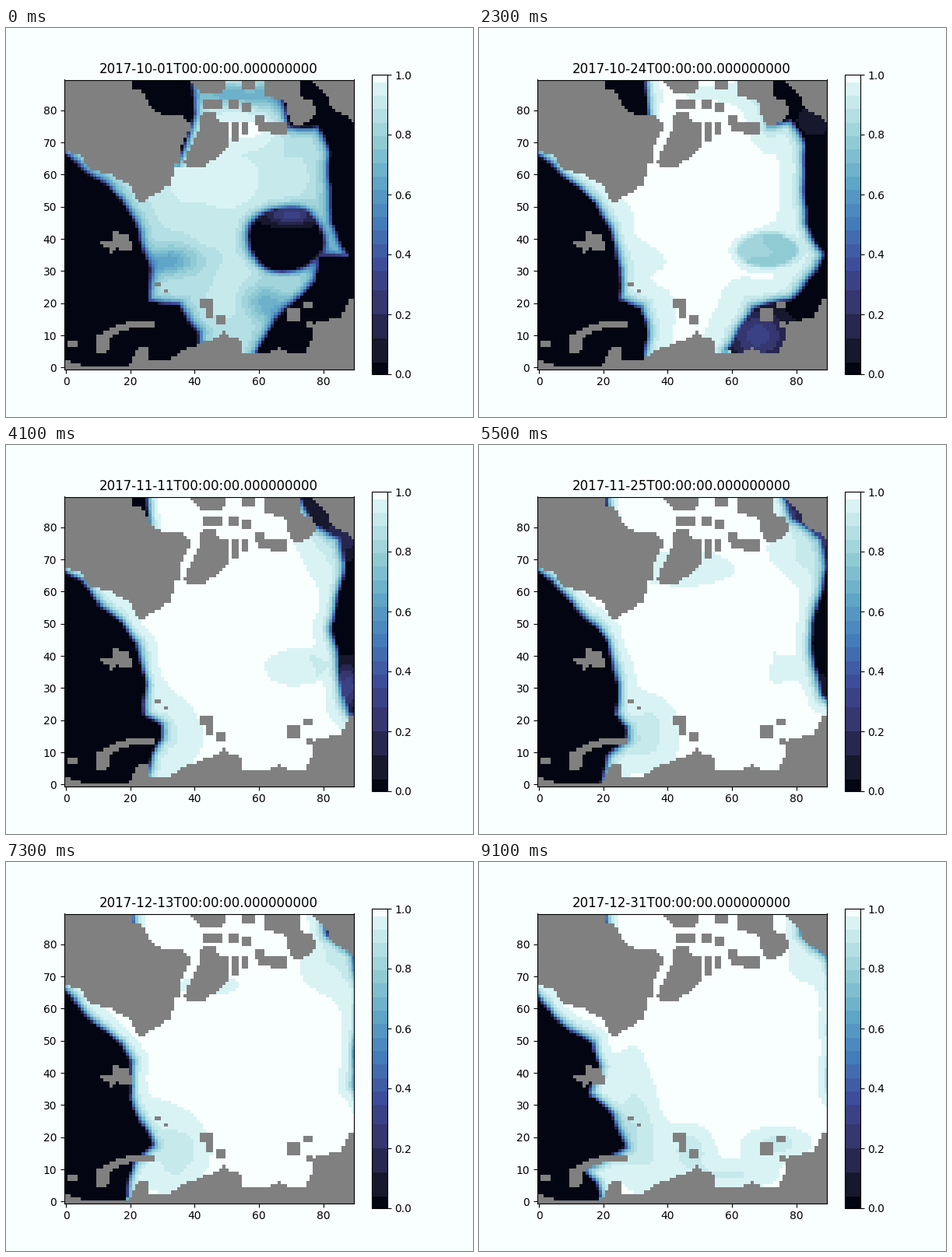
Animation of 600x500 px, one loop 9200 ms. Source, as a matplotlib script:

```python
import numpy as np
import matplotlib.pyplot as plt
from matplotlib.animation import FuncAnimation
from matplotlib.colors import ListedColormap, to_rgb
from matplotlib.path import Path

N, DAYS = 90, 92
CELL = 372 / N
PAPER = "#f9fefe"

# Cell centres in stage pixels, row 0 at the bottom of the map.
X, Y = np.meshgrid(75 + CELL * (np.arange(N) + .5),
                   438.5 - CELL * (np.arange(N) + .5))
POINTS = np.column_stack([X.ravel(), Y.ravel()])


def ice_palette():
    """Twenty flat bands from near-black water to white ice."""
    stops = {0: "#030512", 1: "#17172d", 3: "#363670", 5: "#3e4d9b",
             8: "#447bb9", 11: "#5ea5c7", 14: "#90cbd4", 18: "#d9f3f4",
             19: PAPER}
    rgb = np.array([to_rgb(c) for c in stops.values()])
    bands = np.column_stack([np.interp(np.arange(20), list(stops), channel)
                             for channel in rgb.T])
    edges = np.append(.04 + .08 * np.arange(4), np.linspace(.345, .975, 15))
    levels = (np.arange(400) + .5) / 400
    cmap = ListedColormap(bands[np.searchsorted(edges, levels)])
    cmap.set_bad("#808080")
    return cmap


# ---- land, in stage pixels
GREENLAND = [(60, 50), (160, 50), (160, 78), (174, 78), (183, 98), (198, 110),
             (227, 110), (238, 126), (225, 153), (225, 170), (216, 177),
             (212, 201), (186, 216), (178, 222), (170, 222), (158, 202),
             (134, 187), (108, 181), (97, 165), (60, 148)]
ELLESMERE = [(247, 113), (258, 108), (270, 108), (272, 121), (285, 125),
             (288, 151), (268, 168), (250, 180), (233, 178), (229, 174),
             (236, 152), (247, 130)]
MAINLAND = [(332, 50), (378, 50), (378, 89), (394, 91), (398, 112),
            (376, 125), (365, 121), (357, 92), (332, 86)]
NORTH_ISLE = [(238, 50), (283, 50), (283, 80), (252, 84), (238, 70)]
ALASKA = [(394, 50), (460, 50), (460, 128), (414, 100), (412, 88), (394, 70)]
SIBERIA = [(60, 450), (60, 427), (82, 427), (98, 434), (157, 435), (169, 412),
           (181, 410), (184, 427), (208, 427), (227, 414), (274, 396),
           (281, 387), (285, 396), (300, 400), (304, 417), (340, 417),
           (350, 409), (360, 417), (384, 417), (394, 398), (394, 379),
           (430, 371), (441, 348), (460, 346), (460, 450)]
NOVAYA_ZEMLYA = [(116, 416), (116, 394), (158, 376), (191, 376), (191, 384),
                 (164, 384), (136, 394), (130, 417)]
SVALBARD = [(121, 272), (137, 272), (137, 262), (158, 264), (162, 288),
            (142, 282), (134, 293), (132, 284), (121, 277)]
# Islets: left, top, width, height
ISLETS = [(303, 60, 17, 20), (254, 92, 24, 12), (285, 91, 15, 12),
          (303, 96, 13, 12), (270, 122, 14, 8), (289, 122, 8, 21),
          (303, 120, 9, 18), (319, 113, 13, 13), (324, 121, 14, 13),
          (340, 121, 22, 16), (78, 402, 14, 8), (191, 325, 8, 8),
          (203, 334, 5, 6), (250, 348, 16, 12), (256, 360, 10, 12),
          (270, 368, 10, 12), (361, 362, 15, 15), (381, 352, 13, 9),
          (383, 376, 11, 9)]


def inside(outline):
    return Path(outline).contains_points(POINTS).reshape(N, N)


land = np.zeros((N, N), bool)
for outline in (GREENLAND, ELLESMERE, MAINLAND, NORTH_ISLE, ALASKA, SIBERIA,
                NOVAYA_ZEMLYA, SVALBARD):
    land |= inside(outline)
for left, top, w, h in ISLETS:
    land |= (X > left) & (X < left + w) & (Y > top) & (Y < top + h)

# ---- ice margins: a few shapes each, blended by day
ATLANTIC = {
    0: [(70, 157), (103, 182), (128, 199), (150, 218), (172, 262), (186, 310),
        (183, 350), (222, 354), (234, 376), (250, 390), (250, 430)],
    55: [(70, 157), (96, 173), (122, 207), (150, 231), (166, 250), (179, 305),
         (177, 345), (192, 362), (190, 378), (167, 400), (158, 432)],
    91: [(70, 160), (95, 198), (120, 215), (147, 232), (156, 262), (143, 298),
         (172, 322), (189, 365), (138, 396), (150, 412), (157, 432)]}
PACIFIC = {
    0: [(345, 60), (362, 128), (400, 127), (413, 160), (415, 250), (437, 292),
        (400, 292), (397, 325), (345, 372), (315, 425)],
    23: [(362, 60), (372, 125), (400, 118), (416, 150), (417, 250), (440, 290),
         (430, 312), (400, 348), (350, 358), (315, 415)],
    48: [(380, 60), (400, 95), (437, 120), (440, 155), (417, 230), (421, 285),
         (432, 325), (455, 345), (520, 350), (520, 400)],
    78: [(410, 60), (413, 92), (446, 120), (458, 165), (455, 230), (453, 290),
         (465, 310), (520, 330), (520, 350), (520, 400)]}
BAFFIN = np.array([(238, 50), (243, 110), (231, 150), (220, 175)], float)

# x, y, spread x, spread y, strength, peak day, duration
THIN = [(215, 298, 26, 13, .24, 0, 14), (335, 352, 18, 18, .2, 0, 14),
        (262, 198, 55, 26, -.05, 0, 15), (310, 130, 35, 16, -.1, 0, 15),
        (300, 85, 60, 10, .22, 0, 15), (262, 158, 45, 16, .08, 60, 14),
        (220, 372, 24, 32, .09, 68, 30), (415, 135, 26, 24, .07, 60, 28),
        (330, 402, 35, 12, .08, 90, 12), (275, 372, 18, 22, .09, 92, 12),
        (380, 362, 28, 14, .09, 92, 12), (200, 320, 18, 50, .07, 92, 12)]
FRAZIL = [(365, 240, 22, 9, .32, 0, 10), (358, 395, 26, 22, .35, 25, 9),
          (437, 310, 14, 20, .35, 43, 9), (430, 118, 20, 18, .4, 75, 40),
          (390, 85, 14, 18, .55, 75, 25)]


def ease(s):
    s = np.clip(s, 0, 1)
    return s * s * (3 - 2 * s)


def patches(items, day):
    """Soft spots that grow and fade around their peak day."""
    return sum(strength * np.exp(-((day - peak) / span) ** 2
                                 - ((X - x) / sx) ** 2 / 2
                                 - ((Y - y) / sy) ** 2 / 2)
               for x, y, sx, sy, strength, peak, span in items)


def blend(shapes, day):
    days = list(shapes)
    flat = np.array([np.ravel(shape) for shape in shapes.values()], float)
    return np.array([np.interp(day, days, v) for v in flat.T]).reshape(-1, 2)


def margin(line, corners):
    """Distance to an ice edge, negative on the open-water side."""
    best = np.full((N, N), 1e9)
    for (ax, ay), (bx, by) in zip(line[:-1], line[1:]):
        dx, dy = bx - ax, by - ay
        s = ((X - ax) * dx + (Y - ay) * dy) / (dx * dx + dy * dy + 1e-9)
        s = np.clip(s, 0, 1)
        best = np.minimum(best, np.hypot(X - ax - s * dx, Y - ay - s * dy))
    return np.where(inside(np.vstack([line, corners])), -best, best)


def cover(d):
    return 1 - np.exp(-np.maximum(d + 3, 0) / 4.5)


def ice(day):
    wobble = (np.sin(X / 11 + Y / 17 + day * .25)
              + .7 * np.sin(Y / 8 - X / 23 - day * .17))
    west = margin(blend(ATLANTIC, day), [(40, 450), (40, 157)]) + wobble
    east = margin(blend(PACIFIC, day), [(560, 440), (560, 60)]) + wobble
    bay = margin(BAFFIN - (76 * ease(day / 60), 0), [(80, 175), (80, 50)])
    bay = np.where((Y < 180) & (X > 155), bay, 99)

    # The open pool drifts, shrinks and freezes over.
    closing = ease(day / 25)
    rx, ry = 50 - 10 * closing, 42 - 20 * closing
    ring = np.hypot((X - 359 - 12 * closing) / rx,
                    (Y - 271 - 14 * closing) / ry) - 1
    pool = 1 - np.exp(-day / 14) * (1 - cover(ring * (rx + ry) / 2 + wobble))

    near = np.maximum(np.minimum(west, east), 0)
    thin = (patches(THIN, day) + .09 * np.exp(-day / 9)
            + (.035 + .06 * np.exp(-day / 30)) * np.exp(-near / 26))
    dense = 1 - thin * (1 - .05 * wobble)
    field = dense * cover(west) * cover(east) * cover(bay) * pool
    field = np.clip(np.maximum(field, patches(FRAZIL, day)), 0, 1)
    return np.ma.array(field, mask=land)


fig, ax = plt.subplots(figsize=(6, 5), dpi=100, facecolor=PAPER)
image = ax.imshow(ice(0), origin="lower", cmap=ice_palette(), vmin=0, vmax=1,
                  interpolation="nearest")
fig.colorbar(image, ax=ax)
title = ax.set_title("", x=.497)
START = np.datetime64("2017-10-01", "ns")


def update(day):
    image.set_data(ice(day))
    title.set_text(str(START + np.timedelta64(day, "D")))
    return image, title


anim = FuncAnimation(fig, update, frames=DAYS, interval=100, repeat=True,
                     repeat_delay=0)
plt.show()
```
